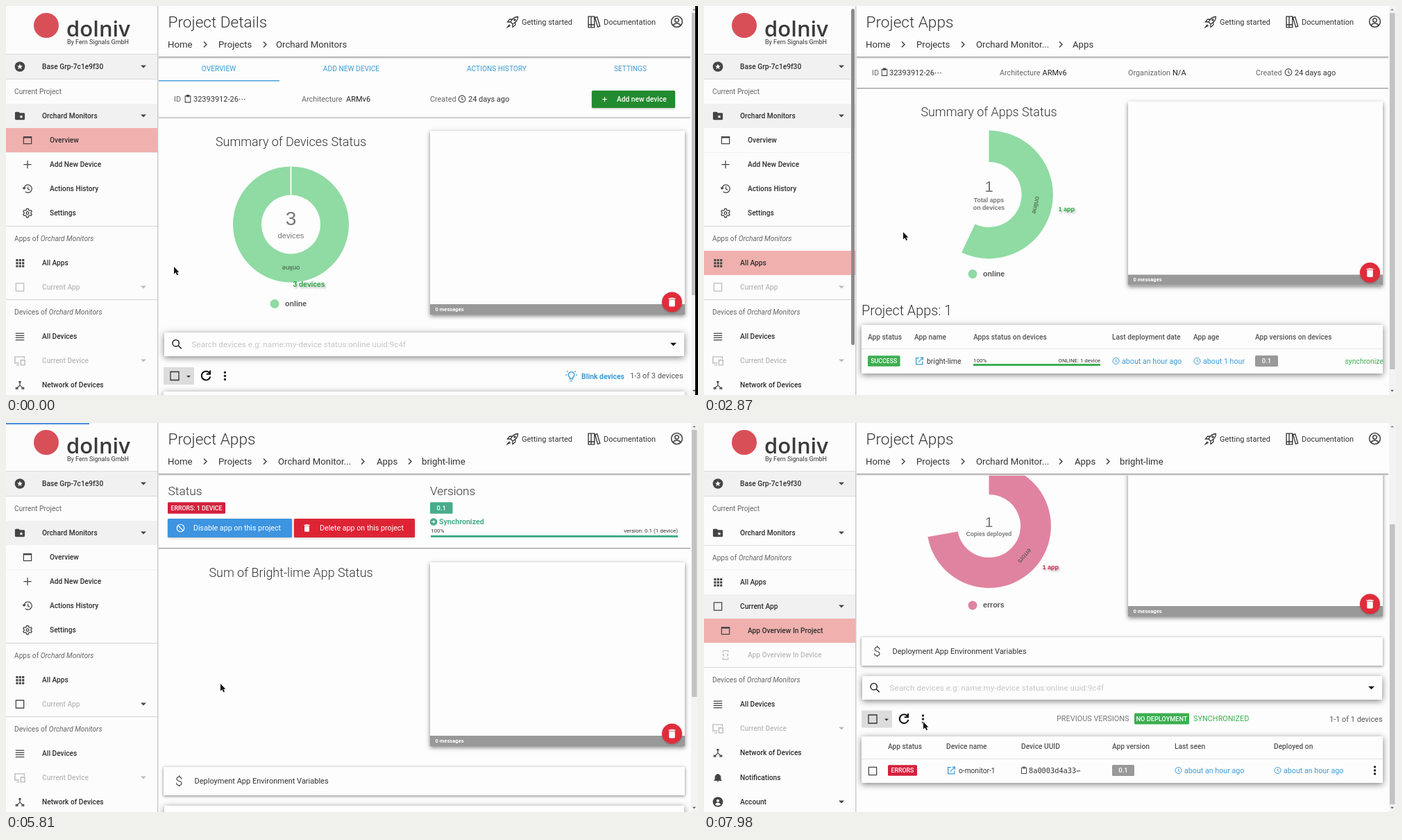
An HTML page with a canvas for the animation above (8000 ms loop, 997 by 561 pixels).

```html
<!DOCTYPE html>
<html lang="en">
<head>
<meta charset="utf-8">
<title>Device dashboard</title>
<style>
html, body { margin: 0; width: 100%; height: 100%; overflow: hidden; background: #fdfdfd; }
canvas { display: block; }
</style>
</head>
<body>
<canvas id="stage" width="997" height="561"></canvas>
<script>
const c = document.getElementById('stage').getContext('2d');
const LOOP = 8000, STEP = 70;
const NAV1 = 1960, NAV2 = 5600, SIDE2 = 6090;
const SANS = 'Roboto, sans-serif', ARIAL = '"Liberation Sans", Arial, sans-serif';
const INK = '#333', GREY = '#666', PALE = '#bbb', BLUE = '#3c9bd6', GREEN = '#3dae50', RED = '#d3213c', TEAL = '#45ad8b';
const PROJECT = 'Orchard Monitors', APP = 'bright-lime';

const circle = (x, y, r) => `M${x + r} ${y}a${r} ${r} 0 1 1 ${-2 * r} 0a${r} ${r} 0 1 1 ${2 * r} 0z`;
const star = 'M12 5l2 5h5l-4 3 1.500 5.500-4.500-3.500-4.500 3.500L9 13 5 10h5z';
const icons = {
  plus: 'M12 3v18M3 12h18',
  win: 'M3 4h18v16H3zM3 6h18',
  history: 'M4 12a9 9 0 1 1 3 6.700M1 9l3 4 4-4M13 7v6l4 2',
  gear: 'M10 2h4l.5 3 2.500 1.500 3-1 2 3.500-2.300 2v2l2.300 2-2 3.500-3-1-2.500 1.500-.5 3h-4l-.5-3L7 17.500l-3 1-2-3.500 2.300-2v-2L2 9l2-3.500 3 1L9.500 5z' + circle(12, 12, 3),
  box: 'M3 3h18v18H3z',
  list: 'M2 5h20M2 10h20M2 15h20M2 20h20',
  devices: 'M21 8V4H2v13h9M14 11h8v10h-8zM5 21h6',
  hub: 'M12 5v8l-7 6M12 13l7 6M10.500 4h3v2h-3zM3 18h4v3H3zM17 18h4v3h-4z',
  code: 'M6 6V2h12v4M6 18v4h12v-4M9 9l-3 3 3 3M15 9l3 3-3 3',
  clip: 'M5 4h14v17H5zM9 2h6v4H9z',
  clock: circle(12, 12, 9) + 'M12 7v6l4 2',
  link: 'M11 4H3v17h17v-8M14 3h7v7M21 3L9 15',
  search: circle(10, 10, 7) + 'M15 15l7 7',
  refresh: 'M19 7a8.500 8.500 0 1 0 1.500 7M20 2v7h-7',
  rocket: 'M22 2c-7 0-11 4-14 10l4 4c6-3 10-7 10-14zM8 12H2l4-5h5M12 16v6l5-4v-5M6 17l-4 5 6-3' + circle(16, 8, 1.5),
  books: 'M2 2h5v20H2zM7 2h6v20H7zM14 4l4-1 5 17-4 1zM2 17h11',
  bulb: 'M9 18v-3a6 6 0 1 1 6 0v3zM10 22h4M0 10h3M21 10h3M3 2l2 2M21 2l-2 2',
  user: circle(12, 12, 10) + circle(12, 9.5, 3.5) + 'M5 19c3-5 11-5 14 0',
  ban: circle(12, 12, 9) + 'M6 6l12 12',
  arrow: 'M7 12h9M12 8l4 4-4 4'
};
const solids = {
  trash: 'M6 19a2 2 0 0 0 2 2h8a2 2 0 0 0 2-2V7H6zM19 4h-3.500l-1-1h-5l-1 1H5v2h14z',
  folder: 'M20 6h-8l-2-2H4a2 2 0 0 0-2 2v12a2 2 0 0 0 2 2h16a2 2 0 0 0 2-2V8a2 2 0 0 0-2-2z',
  bell: 'M12 22a2 2 0 0 0 2-2h-4a2 2 0 0 0 2 2zM19 16v-5c0-3-2-6-5-6.500V3h-4v1.500C7 5 5 8 5 11v5l-2 2v1h18v-1z',
  disc: circle(12, 12, 11),
  person: circle(12, 9, 3.5) + 'M5 18c3-6 11-6 14 0-4 4-10 4-14 0z',
  star,
  grid: [3, 10, 17].map(x => [3, 10, 17].map(y => `M${x} ${y}h5v5h-5z`).join('')).join('')
};

function text(s, x, y, size, color = INK, { w = 400, align = 'left', font = SANS, style = '' } = {}) {
  c.font = `${style} ${w} ${size}px ${font}`;
  c.textAlign = align;
  c.fillStyle = color;
  c.fillText(s, x, y + size * .355);
  return c.measureText(s).width;
}
function rect(x, y, w, h, color) { c.fillStyle = color; c.fillRect(x, y, w, h); }
function dot(x, y, r, color) { c.fillStyle = color; c.beginPath(); c.arc(x, y, r, 0, 7); c.fill(); }
function shadow(blur, dy, alpha, dx = 0) {
  c.shadowColor = `rgba(0,0,0,${alpha})`;
  c.shadowBlur = blur; c.shadowOffsetX = dx; c.shadowOffsetY = dy;
}
function card(x, y, w, h, blur = 9) {
  c.save(); shadow(blur, blur > 4 ? 2 : 1, .5); rect(x, y, w, h, '#fdfdfd'); c.restore();
}
function button(x, y, w, h, color, name, size) {
  c.save();
  shadow(3, 1, .25);
  c.fillStyle = color;
  c.beginPath(); c.roundRect(x, y, w, h, 1.5); c.fill();
  c.restore();
  icon(name, x + 18.5, y + h / 2, size, '#fff', name === 'plus' ? 3 : 2);
}
function icon(name, x, y, size, color = '#444', weight = 2) {
  c.save();
  c.translate(x - size / 2, y - size / 2);
  c.scale(size / 24, size / 24);
  if (solids[name]) { c.fillStyle = color; c.fill(new Path2D(solids[name])); }
  else { c.strokeStyle = color; c.lineWidth = weight; c.stroke(new Path2D(icons[name])); }
  c.restore();
}
function caret(x, y, color = INK, r = 4) {
  c.fillStyle = color;
  c.beginPath(); c.moveTo(x - r, y - r / 2); c.lineTo(x + r, y - r / 2); c.lineTo(x, y + r / 2); c.fill();
}
function badge(s, x, y, w, h, color, size = 8.8) {
  c.fillStyle = color;
  c.beginPath(); c.roundRect(x, y - h / 2, w, h, 1.5); c.fill();
  text(s, x + w / 2, y, size, '#fff', { w: 500, align: 'center' });
}
function dots(x, y) { for (const d of [-5, 0, 5]) dot(x, y + d, 1.7, '#222'); }
function rule(y) { rect(220, y, 766, 1, '#999'); rect(220, y + 1, 766, 1, '#e4e4e4'); }
function ago(s, x, y) { icon('clock', x, y, 12, BLUE); text(s, x + 8.5, y, 10.7, BLUE); }
function heads(list, y) { list.forEach(([s, x]) => text(s, x, y, 10.2, '#555', { w: 500 })); }

// Piecewise track over [time, ...values] keys
function track(keys, t, ease = u => u) {
  if (t <= keys[0][0]) return keys[0].slice(1);
  for (let i = 1; i < keys.length; i++) {
    const [a, b] = [keys[i - 1], keys[i]];
    if (t <= b[0]) {
      const u = ease((t - a[0]) / (b[0] - a[0]));
      return a.slice(1).map((v, k) => v + (b[k + 1] - v) * u);
    }
  }
  return keys[keys.length - 1].slice(1);
}
const smooth = u => u * u * (3 - 2 * u);

function row(y, name, label, { sub, bg, dim, arrow, arrowInk } = {}) {
  if (bg) rect(0, y - 17.5, 219, 35, bg);
  const x = sub ? 31 : 20, ink = dim ? PALE : '#444';
  if (name === 'stars') { icon('disc', x, y, 16, ink); icon('star', x, y, 14, '#fff'); }
  else if (name === 'account') { icon('disc', x, y, 16, ink); icon('person', x, y, 14, '#fff'); }
  else if (name === 'folder') { icon(name, x, y, 17, ink); icon('star', x + 2, y + 1, 9, '#fff'); }
  else icon(name, x, y, name === 'devices' ? 17 : 15, ink);
  text(label, sub ? 63 : 52, y, 10.2, dim ? PALE : '#2e2e2e', { w: 500 });
  if (arrow) caret(198, y, dim && !arrowInk ? PALE : '#444');
}
function section(y, lead) {
  const w = text(lead, 12, y, 10.2, GREY);
  text(PROJECT, 12 + w, y, 10.2, GREY, { style: 'italic' });
}
const SHADE = '#f1f1f1', PINK = '#f0b1ae';

function sidebar(t) {
  rect(0, 0, 219, 561, '#fcfcfc');
  dot(58, 28, 18, '#d94f58');
  text('dolniv', 87, 33, 31, '#3a3a3c', { w: 600, font: '"Open Sans", sans-serif' });
  text('By Fern Signals GmbH', 88, 52, 9, INK);
  row(87.5, 'stars', 'Base Grp-7c1e9f30', { bg: SHADE, arrow: 1 });
  rect(0, 69, 219, 1, '#ddd'); rect(0, 105, 219, 1, '#ddd');
  text('Current Project', 12, 123.5, 10.2, GREY);
  const late = t >= SIDE2;
  row(158.5, 'folder', PROJECT, { bg: late ? null : SHADE, arrow: 1 });
  if (!late) {
    const hover = t > 560 && t < NAV1 ? '#fce6e7' : null;
    row(193.5, 'win', 'Overview', { sub: 1, bg: t < NAV1 ? PINK : null });
    rect(0, 211, 219, 1, '#f2f2f2');
    row(228.5, 'plus', 'Add New Device', { sub: 1 });
    row(263.5, 'history', 'Actions History', { sub: 1 });
    row(298.5, 'gear', 'Settings', { sub: 1 });
    rect(0, 317, 219, 1, '#d4d4d4');
    section(335.5, 'Apps of ');
    row(370.5, 'grid', 'All Apps', { bg: t >= NAV1 && t < NAV2 ? PINK : hover });
    const open = t >= NAV2;
    row(405.5, 'box', 'Current App', { dim: 1, arrow: 1, arrowInk: open });
    if (open) icon('box', 20, 405.5, 15);
    rect(0, 423, 219, 1, '#d4d4d4');
    section(441.5, 'Devices of ');
    row(476.5, 'list', 'All Devices');
    row(511.5, 'devices', 'Current Device', { dim: 1, arrow: 1 });
    row(546.5, 'hub', 'Network of Devices');
  } else {
    rect(0, 176, 219, 1, '#e2e2e2');
    section(194.5, 'Apps of ');
    rect(0, 211, 219, 1, '#f2f2f2');
    row(229.5, 'grid', 'All Apps');
    row(264.5, 'box', 'Current App', { bg: SHADE, arrow: 1 });
    row(299.5, 'win', 'App Overview In Project', { sub: 1, bg: PINK });
    row(334.5, 'code', 'App Overview In Device', { sub: 1, dim: 1 });
    rect(0, 352, 219, 1, '#d4d4d4');
    section(370.5, 'Devices of ');
    row(405.5, 'list', 'All Devices');
    row(440.5, 'devices', 'Current Device', { dim: 1, arrow: 1 });
    row(475.5, 'hub', 'Network of Devices');
    row(511.5, 'bell', 'Notifications');
    row(546.5, 'account', 'Account', { arrow: 1 });
  }
  if ((t > 350 && t < 3400) || (t >= SIDE2 && t < 7070)) {
    c.fillStyle = '#8b8b8b';
    c.beginPath(); c.roundRect(212, 4, 5, 485, 2.5); c.fill();
  }
  rect(218, 0, 1, 561, '#c9c9c9'); rect(219, 0, 1, 561, '#e6e6e6');
}

function header(page) {
  rect(220, 0, 767, 74, '#fdfdfd');
  rect(220, 73, 766, 1.5, '#9c9c9c'); rect(220, 74.5, 766, 1.5, '#e2e2e2');
  text(page ? 'Project Apps' : 'Project Details', 233.5, 23, 22.6, INK, { w: 300 });
  const crumbs = [['Home', 233], ['Projects', 306]];
  crumbs.push(page ? [PROJECT.slice(0, -1) + '...', 392] : [PROJECT, 389]);
  if (page) crumbs.push(['Apps', page > 1 ? 534 : 531]);
  if (page > 1) crumbs.push([APP, 599]);
  crumbs.forEach(([s, x]) => text(s, x, 55, 13.2));
  c.strokeStyle = INK; c.lineWidth = 1.3;
  [287, 373, 514, 582].slice(0, crumbs.length - 1).forEach(x => {
    c.beginPath(); c.moveTo(x - 2, 51.5); c.lineTo(x + 2, 55.5); c.lineTo(x - 2, 59.5); c.stroke();
  });
  icon('rocket', 730, 23, 18, INK, 1.7);
  text('Getting started', 743, 23.5, 11);
  icon('books', 847, 23, 19, INK, 1.7);
  text('Documentation', 861, 23.5, 11);
  icon('user', 966.5, 22.5, 19);
}

function panel(y) {
  card(611, y, 367, 265, 6);
  rect(611, y + 250, 367, 15, '#999');
  text('0 messages', 618.5, y + 257, 7.6, '#fff', { w: 700 });
  c.save(); shadow(3, 1, .25); dot(959.5, y + 247, 14.5, '#e02c3b'); c.restore();
  icon('trash', 959.5, y + 247, 17, '#fff');
}

function chart(y, title, o) {
  text(title, 410.5, y, 17.9, INK, { w: 300, align: 'center' });
  if (!o.p) return;
  const cx = 410.5, cy = y + 119.5, p = o.p, R = o.R + 16 * (1 - p), r = o.R * .51 + 8 * (1 - p);
  const a0 = -Math.PI / 2, a1 = a0 + p * 2 * Math.PI, mid = p * Math.PI;
  c.fillStyle = o.color;
  c.beginPath(); c.arc(cx, cy, R, a0, a1); c.arc(cx, cy, r, a1, a0, true); c.fill();
  if (p >= 1) rect(cx - .9, cy - R, 1.8, R - r, '#fff');
  c.save();
  c.translate(cx + Math.sin(mid) * (R + r) / 2, cy - Math.cos(mid) * (R + r) / 2);
  c.rotate(mid);
  text(o.kind, 0, 0, 9.5, '#40543f', { align: 'center', font: ARIAL });
  c.restore();
  c.save();
  shadow(3, 2, .3, 2);
  text(o.label, cx + 3 + Math.sin(mid) * (R + 7), cy - Math.cos(mid) * (R + 3), o.size || 9, o.ink, { w: 700, font: ARIAL });
  c.restore();
  for (const [s, dy, size, w] of o.center)
    text(s, cx, cy + dy, size, '#777', { w, align: 'center', font: ARIAL });
  dot(387, y + 234, 6.5, o.color);
  text(o.kind, 402, y + 233.5, 10.6, '#555', { w: 700, font: ARIAL });
}

function searchBar(y) {
  card(228, y, 749, 34);
  icon('search', 246, y + 16.5, 16, '#222', 2.3);
  text('Search devices e.g: name:my-device status:online uuid:9c4f', 267.5, y + 17, 11.7, '#c6c6c6');
  caret(961.5, y + 17, '#111', 4.5);
}
function toolbar(y, count, right) {
  rect(227, y - 12.5, 44, 25, '#dcdcdc');
  icon('box', 243, y, 16, INK);
  caret(263, y + 1, INK, 3);
  icon('refresh', 288, y - .5, 18, '#111', 2.8);
  dots(315.5, y);
  text(count, right, y, 10.9, '#555', { align: 'right' });
}

function detailsPage() {
  ['OVERVIEW', 'ADD NEW DEVICE', 'ACTIONS HISTORY', 'SETTINGS'].forEach((s, i) =>
    text(s, [306.5, 497.5, 707, 899.5][i], 90.5, 10.2, BLUE, { align: 'center' }));
  rect(220, 107, 174, 1.5, '#4aa3dc');
  text('ID', 242, 134.5, 10.8, GREY);
  icon('clip', 262, 134, 13);
  text('32393912-26⋯', 270, 134.5, 11);
  text('Architecture', 426, 134.5, 10.8, GREY);
  text('ARMv6', 490, 134.5, 11, '#222');
  text('Created', 611, 134.5, 10.8, GREY);
  icon('clock', 657, 134, 13);
  text('24 days ago', 666, 134.5, 11);
  button(844, 122, 120, 25, '#228b2f', 'plus', 9);
  text('Add new device', 880, 134.5, 10.2, '#fff', { w: 500 });
  rule(160.5);
  chart(195.5, 'Summary of Devices Status', {
    p: 1, R: 83.5, color: '#8fdba3', ink: '#28a745', kind: 'online', label: '3 devices', size: 10.2,
    center: [['3', -9, 28, 400], ['devices', 16, 11.2, 400]]
  });
  panel(180);
  searchBar(471);
  toolbar(533.5, '1-3 of 3 devices', 975.5);
  icon('bulb', 814.5, 533.5, 17, BLUE);
  text('Blink devices', 829, 534, 10.4, BLUE, { w: 700 });
  card(227, 556, 751, 30);
}

function appsPage(t) {
  text('ID', 242, 96, 10.8, GREY);
  icon('clip', 260, 95.5, 13);
  text('32393912-26⋯', 267, 96, 11);
  text('Architecture', 426, 96, 10.8, GREY);
  text('ARMv6', 487.5, 96, 11, '#222');
  text('Organization', 611, 96, 10.8, GREY);
  text('N/A', 675, 96, 11, '#222');
  text('Created', 795, 96, 10.8, GREY);
  icon('clock', 842, 95.5, 13);
  text('24 days ago', 851, 96, 11);
  rule(118);
  const [p] = track([[2240, 0], [2870, .57], [3640, 1]], t);
  chart(152.5, 'Summary of Apps Status', {
    p, R: 85.5, color: '#8fdba3', ink: '#28a745', kind: 'online', label: '1 app',
    center: [['1', -12, 22, 400], ['Total apps', 8, 8.8, 700], ['on devices', 18.5, 8.8, 700]]
  });
  panel(137.5);
  text('Project Apps: 1', 227, 439, 19.8, INK, { w: 300 });
  card(227, 460, 751, 70);
  const hover = t > 4130 && t < 5110;
  if (hover) rect(227, 494, 751, 36, '#f0f0f0');
  rect(227, 494, 751, 1, '#e4e4e4');
  heads([['App status', 236], ['App name', 303], ['Apps status on devices', 388],
    ['Last deployment date', 588], ['App age', 705], ['App versions on devices', 794]], 477.5);
  badge('SUCCESS', 236, 512, 46.5, 15.5, GREEN);
  icon('link', 310.5, 512, 13, BLUE, 2.4);
  text(APP, 321, 512, 10.4);
  text('100%', 388, 511, 8);
  text('ONLINE: 1 device', 571, 511, 7.9, INK, { align: 'right' });
  rect(388, 516, 183, 3, GREEN);
  ago('about an hour ago', 593.5, 512);
  ago('about 1 hour', 710.5, 512);
  badge('0.1', 794, 512, 33, 16, '#999', 9.5);
  c.save();
  c.beginPath(); c.rect(900, 495, 78, 35); c.clip();
  text('synchronized', 923.5, 512, 10.4, GREEN);
  c.restore();
  if (hover) rect(229, 524, 732, 4, '#9a9a9a');
}

function appPage(t) {
  text('Status', 233.5, 98, 17.4, INK, { w: 300 });
  text('Versions', 611, 98, 17.2, INK, { w: 300 });
  badge('ERRORS: 1 DEVICE', 233, 122.5, 83, 16.5, RED);
  badge('0.1', 611, 122.5, 32.5, 16.5, TEAL, 9.5);
  button(233, 138, 179, 27, '#3d94e0', 'ban', 14);
  text('Disable app on this project', 270, 151.5, 10.7, '#fff');
  button(415, 138, 174, 27, '#dd2434', 'trash', 14);
  text('Delete app on this project', 452, 151.5, 10.7, '#fff');
  dot(616, 142.5, 5.3, TEAL);
  icon('arrow', 615.5, 142.5, 12, '#fff', 2.4);
  text('Synchronized', 624, 142.5, 10.6, TEAL, { w: 600 });
  text('100%', 612, 155.5, 8);
  text('version: 0.1 (1 device)', 968, 155.5, 8, INK, { align: 'right' });
  rect(612, 162, 356, 3, TEAL);
  rule(180);
  const [p] = track([[6160, 0], [6720, .543], [7980, .722]], t);
  chart(216, 'Sum of Bright-lime App Status', {
    p, R: 85, color: '#e083a0', ink: '#c9244a', kind: 'errors', label: '1 app',
    center: [['1', -6, 21, 400], ['Copies deployed', 11.5, 8.2, 700]]
  });
  panel(201);
  card(227, 496, 751, 41, 4);
  text('$', 244, 516, 19, INK, { w: 300 });
  text('Deployment App Environment Variables', 271.5, 516, 11);
  searchBar(552);
  toolbar(614, '1-1 of 1 devices', 977.5);
  text('PREVIOUS VERSIONS', 508, 613.5, 10.9, '#777');
  badge('NO DEPLOYMENT', 620, 613.5, 79, 16, GREEN, 9.2);
  text('SYNCHRONIZED', 705, 613.5, 10.9, GREEN);
  card(227, 639, 751, 67);
  rect(227, 671, 751, 1, '#e4e4e4');
  heads([['App status', 265], ['Device name', 349], ['Device UUID', 457],
    ['App version', 588], ['Last seen', 678], ['Deployed on', 821]], 653.5);
  icon('box', 243, 689, 15);
  badge('ERRORS', 265, 688, 42, 15.5, RED);
  icon('link', 356.5, 688, 13, BLUE, 2.4);
  text('o-monitor-1', 367, 688, 10.2);
  icon('clip', 461, 688, 12);
  text('8a0003d4a33⋯', 468, 688, 10.3, INK, { font: '"DejaVu Sans Mono", monospace' });
  badge('0.1', 588, 688, 32, 16, '#999', 9.5);
  ago('about an hour ago', 683.5, 688);
  ago('about an hour ago', 826.5, 688);
  dots(966.5, 688);
}

function scrollbar(y, h) {
  rect(987, 0, 10, 561, '#f3f3f3');
  rect(988, y, 7.5, h, '#c3c3c3');
  caret(991.5, 555, '#555', 2.5);
  c.save(); c.translate(991.5, 5); c.scale(1, -1); caret(0, 0, '#888', 2.5); c.restore();
}

const pointerKeys = [[0, 242, 376], [140, 242, 376], [700, 96, 371], [980, 96, 371], [1400, 245, 331], [1680, 262, 330],
  [2870, 287, 326], [3600, 300, 360], [4200, 342, 484], [4550, 342, 484], [4900, 310, 391], [5180, 309, 376],
  [5880, 309, 376], [6300, 400, 398], [6720, 416, 402], [7000, 416, 402], [7840, 318, 430], [7980, 316, 431]];
function pointer(t) {
  const [x, y] = track(pointerKeys, t, smooth);
  c.save();
  c.translate(x, y);
  if (t > 4760 && t < 5040) {
    c.strokeStyle = '#777'; c.lineWidth = 1;
    c.stroke(new Path2D('M-2.500-6.500h2l.5.500.5-.500h2M0-6V6M-2.500 6.500h2l.5-.500.5.500h2'));
  } else {
    c.scale(.92, .92);
    const arrow = new Path2D('M0 0V11.500L2.700 9 4.700 13.200 6.600 12.300 4.700 8.300H8z');
    c.strokeStyle = '#fff'; c.lineWidth = 1.6; c.stroke(arrow);
    c.fillStyle = '#111'; c.fill(arrow);
  }
  c.restore();
}

function draw(t) {
  const page = t < NAV1 ? 0 : t < NAV2 ? 1 : 2;
  rect(0, 0, 997, 561, '#fdfdfd');
  const [s] = page === 1 ? track([[3710, 0], [3990, 28]], t, smooth)
    : page === 2 ? track([[6230, 0], [6580, 187]], t, smooth) : [0];
  c.save();
  c.beginPath(); c.rect(220, 74, 767, 487); c.clip();
  c.translate(0, -s);
  [detailsPage, appsPage, appPage][page](t);
  c.restore();
  header(page);
  if (page === 0) scrollbar(10, 407);
  else if (page === 1) scrollbar(10 + s * 27 / 28, 514);
  else scrollbar(10 + s * 136 / 187, 385 + s * 19 / 187);
  // The window edge shows briefly at the start
  if (t < 140) rect(993, 0, 4, 561, '#000');
  sidebar(t);
  const since = t - (page === 2 ? NAV2 : NAV1);
  if (page && since < 420) rect(0, 0, 60 + since * 60 / 210, 2, '#4a8fe0');
  pointer(t);
}

const start = performance.now();
function frame(now) {
  const t = Math.max(0, now - start) % LOOP;
  draw(Math.floor(t / STEP) * STEP);
  requestAnimationFrame(frame);
}
draw(0);
requestAnimationFrame(frame);
</script>
</body>
</html>
```
